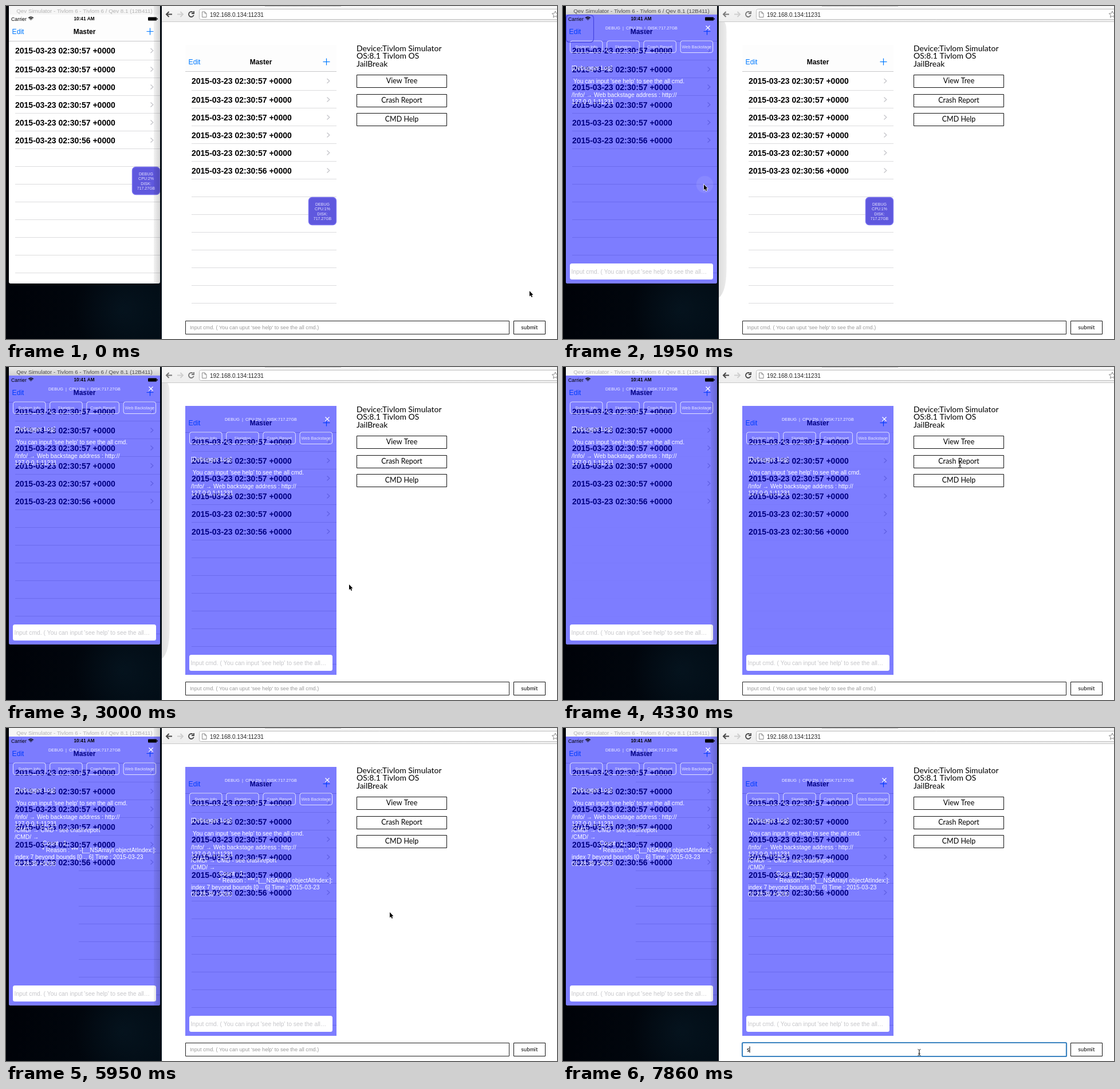
Animation of 962 by 582 pixels, one loop 8 s. Source, as an HTML page with a canvas:

```html
<!DOCTYPE html>
<html lang="en">
<head>
<meta charset="utf-8">
<title>Remote debugger</title>
<style>
html, body { margin: 0; width: 100%; height: 100%; overflow: hidden; background: #fff; }
canvas { display: block; }
</style>
</head>
<body>
<canvas id="stage" width="962" height="582"></canvas>
<script>
const ctx = document.getElementById('stage').getContext('2d');
const LOOP = 8000, STEP = 148.3;
const SANS = '"Liberation Sans", Arial, sans-serif';
const ROUND = 'Lato, sans-serif';
const BLUE = '#007aff', VEIL = 'rgba(0,0,255,.51)';

const TIME = {
  press: 1400, release: 1600, open: 1900, mirrorOpen: 2330,
  browserFront: 4300, log: 5400, mirrorLog: 5650, focus: 7000, typed: 7550
};
const CPU = [[0, 2], [150, 1], [300, 3], [450, 2], [1700, 3], [3150, 2], [3700, 3],
  [4200, 2], [4750, 4], [5300, 2], [5900, 3], [6350, 1], [7100, 2], [7550, 3]];
const POINTER = [[0, 914, 498], [700, 914, 498], [1350, 246, 312], [2050, 246, 312],
  [2700, 585, 376], [3000, 599, 380], [3250, 604, 382], [3890, 680, 172],
  [4500, 697, 170], [5700, 697, 170], [6240, 630, 551], [6500, 622, 567], [LOOP, 622, 567]];

const LOG = [
  [18, 131.5, "You can input 'see help' to see the all cmd."],
  [15, 155, '/Info/ → Web backstage address : http://'],
  [15, 167, '127.0.0.1:11231']
];
const CRASH_LOG = [
  [15, 178.5, '/CMD/ → CMD - see crashreport'],
  [15, 190, '/CMD/ →'],
  [64, 201.5, 'Count : 1;'],
  [63, 213.5, '* Reason : *** -[__NSArrayI objectAtIndex:]:'],
  [15, 225, 'index 7 beyond bounds [0 .. 6] Time : 2015-03-23'],
  [15, 237, '02:28:39 +0000']
];

function text(str, x, midY, size, color = '#000', { weight = 400, align = 'left', family = SANS } = {}) {
  ctx.font = `${weight} ${size}px ${family}`;
  ctx.textAlign = align;
  ctx.fillStyle = color;
  ctx.fillText(str, x, midY + size * 0.36);
}

function box(x, y, w, h, r, fill, stroke, width = 1) {
  ctx.beginPath();
  ctx.roundRect(x, y, w, h, r);
  if (fill) { ctx.fillStyle = fill; ctx.fill(); }
  if (stroke) { ctx.strokeStyle = stroke; ctx.lineWidth = width; ctx.stroke(); }
}

function line(color, width, ...points) {
  ctx.beginPath();
  for (let i = 0; i < points.length; i += 2) ctx.lineTo(points[i], points[i + 1]);
  ctx.strokeStyle = color;
  ctx.lineWidth = width;
  ctx.stroke();
}

function gradient(x0, y0, x1, y1, ...colors) {
  const g = ctx.createLinearGradient(x0, y0, x1, y1);
  colors.forEach((c, i) => g.addColorStop(i / (colors.length - 1), c));
  return g;
}

const mix = (a, b, k) => a + (b - a) * k;
const cpuAt = t => CPU.filter(([start]) => start <= t).pop()[1];

function pointerAt(t) {
  const i = POINTER.findIndex(p => p[0] > t);
  const [a, b] = [POINTER[i - 1], POINTER[i]];
  const k = (t - a[0]) / (b[0] - a[0]), ease = k * k * (3 - 2 * k);
  return [mix(a[1], b[1], ease), mix(a[2], b[2], ease)];
}

function list(lineX, lineAlpha) {
  box(5, 15, 264, 470, 0, '#fff');
  box(5, 15, 264, 46, 0, '#fdfdfd');
  text('Edit', 10.5, 45, 12.2, BLUE);
  text('Master', 137, 45, 12, '#000', { weight: 700, align: 'center' });
  line(BLUE, 1.2, 245.5, 44.5, 257.5, 44.5);
  line(BLUE, 1.2, 251.5, 38.5, 251.5, 50.5);
  ctx.globalAlpha = lineAlpha;
  line('#c8c8ca', 1, 5, 61.5, 269, 61.5);
  for (let i = 0; i < 13; i++) line('#dcdcde', 1, lineX, 94.5 + 31 * i, 269, 94.5 + 31 * i);
  ctx.globalAlpha = 1;
  for (let i = 0; i < 6; i++) {
    const y = i ? 79.5 + 31 * i : 78;
    text(`2015-03-23 02:30:5${i < 5 ? 7 : 6} +0000`, 16, y, 14, '#000', { weight: 700 });
    line('#c4c4c9', 1.3, 252.5, y - 4, 256.8, y, 252.5, y + 4);
  }
}

function widget(cpu) {
  box(220.5, 281.5, 48, 48, 6, '#5f58de', '#7770ef', 1.4);
  ['DEBUG', `CPU:${cpu}%`, 'DISK:', '717.27GB'].forEach((s, i) =>
    text(s, 244.5, 293.5 + 8.4 * i, 7, '#e8e6ff', { align: 'center' }));
}

function panel(cpu, hasCrash) {
  box(5, 15, 264, 470, 0, VEIL);
  text(`DEBUG  |  CPU:${cpu}%  |  DISK:717.27GB`, 137, 38, 7.3, '#f2f2ff', { align: 'center' });
  line('#fff', 1.3, 249.5, 34.5, 256.5, 41.5);
  line('#fff', 1.3, 256.5, 34.5, 249.5, 41.5);
  ['System Info', 'Skeleton', 'Crash Report', 'Web Backstage'].forEach((s, i) => {
    const x = 12.5 + 64.2 * i;
    box(x, 61, 56.5, 20.5, 3.5, null, '#e4e4ff');
    text(s, x + 28.2, 71, 7.4, '#e8e8ff', { align: 'center' });
  });
  text('[Debugger Log]', 15, 108, 10.3, '#fff');
  for (const [x, y, s] of hasCrash ? LOG.concat(CRASH_LOG) : LOG) text(s, x, y, 10.3, '#fff');
  box(12, 450, 250, 28, 3.5, '#fff');
  text("Input cmd. ( You can input 'see help' to see the all…", 14.5, 464, 10.3, '#c6c6ca');
}

function statusBar() {
  text('Carrier', 9, 22.5, 8.8);
  ctx.lineWidth = 1.4;
  ctx.strokeStyle = '#000';
  for (const r of [1, 3.4, 5.8]) {
    ctx.beginPath();
    ctx.arc(43.5, 25, r, -Math.PI * 0.76, -Math.PI * 0.24);
    ctx.stroke();
  }
  text('10:41 AM', 136.5, 22.5, 8.2, '#000', { weight: 700, align: 'center' });
  box(248, 19.5, 15, 6, 1, '#000');
  box(263.5, 21.2, 1.5, 2.6, 0.5, '#000');
}

function openingPanel(t) {
  const k = Math.max(0, (t - TIME.release) / (TIME.open - TIME.release));
  const x = mix(220, 5, k), y = mix(281, 15, k);
  box(x, y, mix(48.5, 264, k), mix(48.5, 470, k), 6, VEIL);
  box(x, y, 48.5, 48.5, 6, null, '#4b45e6', 1.6);
}

function touchMark(t) {
  const strength = Math.min(1, 1 - (t - TIME.release) / 500);
  if (t < TIME.press || strength <= 0) return;
  ctx.beginPath();
  ctx.arc(247.5, 312, 9 + 9 * (1 - strength), 0, 7);
  ctx.fillStyle = `rgba(200,200,255,${0.4 * strength})`;
  ctx.fill();
}

function simulator(t, active) {
  box(5, 0, 264, 16, 0, active ? gradient(0, 0, 0, 15, '#ebebeb', '#d0d0d0') : '#f6f6f6');
  text('Qev Simulator - Tivlom 6 - Tivlom 6 / Qev 8.1 (12B411)', 137, 8, 9.8,
    active ? '#4c4c4c' : '#b4b4b4', { align: 'center' });
  ctx.save();
  ctx.beginPath();
  ctx.roundRect(5, 15, 264, 470, [0, 0, 3, 3]);
  ctx.clip();
  list(t < TIME.log ? 16 : 127, t >= TIME.browserFront && t < TIME.log ? 0.12 : 1);
  if (t < TIME.press) widget(cpuAt(t));
  else if (t < TIME.open) openingPanel(t);
  else {
    panel(cpuAt(t), t >= TIME.log);
    const fade = 1 - (t - TIME.open) / 250;
    if (fade > 0) box(5.5, 15.5, 48, 48, 6, null, `rgba(60,60,220,${fade})`, 1.2);
  }
  statusBar();
  touchMark(t);
  ctx.restore();
  if (!active) box(258, 0, 11, 485, 0, gradient(257, 0, 269, 0, 'rgba(0,0,0,.04)', 'rgba(0,0,0,.17)'));
}

function desktop() {
  box(0, 0, 272, 582, 0, gradient(0, 480, 272, 540, '#000208', '#01060d', '#020d16'));
  const glow = ctx.createRadialGradient(205, 530, 5, 205, 530, 85);
  glow.addColorStop(0, 'rgba(10,32,46,.4)');
  glow.addColorStop(1, 'rgba(10,32,46,0)');
  box(0, 485, 272, 97, 0, glow);
}

function toolbar(active) {
  const ink = active ? '#454545' : '#777';
  box(272, 0, 690, 27, 0, gradient(0, 0, 0, 27, '#f6f6f6', '#ededed'));
  line('#c9c9c9', 1, 272, 27.5, 962, 27.5);
  line('#c4c4c4', 1, 452, 0.5, 585, 0.5);
  line(ink, 2, 290, 14.5, 280, 14.5);
  line(ink, 2, 284.5, 10, 280, 14.5, 284.5, 19);
  line('#cfcfcf', 2, 299, 14.5, 309, 14.5);
  line('#cfcfcf', 2, 304.5, 10, 309, 14.5, 304.5, 19);
  ctx.beginPath();
  ctx.arc(323.5, 14.5, 4.5, 0.3, 5.4);
  ctx.strokeStyle = ink;
  ctx.lineWidth = 1.8;
  ctx.stroke();
  line(ink, 1.8, 328, 9, 328, 13, 324, 13);
  box(337.5, 5.5, 640, 18, 3, '#fff', '#bdbdbd');
  line('#888', 1, 342.5, 10, 347, 10, 350, 13, 350, 19.5, 342.5, 19.5, 342.5, 10);
  line('#888', 1, 347, 10, 347, 13, 350, 13);
  text('192.168.0.134:11231', 356, 15, 10, '#222');
  const star = [];
  for (let i = 0; i <= 10; i++) {
    const a = i * Math.PI / 5 - Math.PI / 2, r = i % 2 ? 2.8 : 6;
    star.push(959 + r * Math.cos(a), 15 + r * Math.sin(a));
  }
  line('#888', 1, ...star);
}

function simulatorShadow() {
  ctx.beginPath();
  ctx.moveTo(272, 27);
  ctx.lineTo(281, 27);
  ctx.quadraticCurveTo(285.5, 30, 285.5, 45);
  ctx.lineTo(285.5, 460);
  ctx.quadraticCurveTo(285, 500, 272, 510);
  ctx.fillStyle = gradient(272, 0, 286, 0, '#dedede', '#ececec');
  ctx.fill();
}

function browser(t, active) {
  box(272, 0, 690, 582, 0, '#fff');
  if (!active) simulatorShadow();
  toolbar(active);

  ctx.save();
  ctx.translate(308, 53);
  list(16, t >= TIME.browserFront && t < TIME.mirrorLog ? 0.2 : 1);
  if (t < TIME.mirrorOpen) widget(1);
  else panel(2, t >= TIME.mirrorLog);
  ctx.restore();

  ['Device:Tivlom Simulator', 'OS:8.1 Tivlom OS', 'JailBreak'].forEach((s, i) =>
    text(s, 612, 74 + 13.4 * i, 14, '#000', { family: ROUND }));
  ['View Tree', 'Crash Report', 'CMD Help'].forEach((s, i) => {
    const y = 120.5 + Math.round(33.5 * i);
    box(612.5, y, 157, 22, 0, '#fff', '#111');
    text(s, 691, y + 10.3, 12.5, '#000', { align: 'center', family: ROUND });
  });

  const focused = t >= TIME.focus, typed = t >= TIME.typed;
  box(313.5, 550.5, 565, 23, 0, '#fff', '#222');
  if (focused) {
    const caretX = typed ? 326 : 321.5;
    box(313, 550, 566, 24, 1.5, null, '#3b83c0', 2.2);
    line('#000', 1, caretX, 556.5, caretX, 567.5);
  }
  if (typed) text('s', 321, 562, 10.5, '#000', { family: ROUND });
  else text("Input cmd. ( You can uput 'see help' to see the all cmd.)", 321, 562, 9.2, '#999');
  box(886.5, 550.5, 55, 23, 0, '#fff', '#111');
  text('submit', 914, 561.5, 9.7, '#000', { align: 'center', family: ROUND });
}

function pointer(t) {
  const [x, y] = pointerAt(t);
  ctx.save();
  ctx.translate(Math.round(x), Math.round(y));
  if (t > 3800 && (t < 5720 || t > 6350)) {
    line('#222', 1, -2.5, -5.5, -0.5, -4.5, 0, -4.5, 0.5, -4.5, 2.5, -5.5);
    line('#222', 1.2, 0, -4.5, 0, 4.5);
    line('#222', 1, -2.5, 5.5, 0, 4.5, 2.5, 5.5);
    line('#222', 1, -1.8, 2, 1.8, 2);
  } else {
    ctx.beginPath();
    for (const [px, py] of [[0, 0], [0, 9.5], [2.1, 7.6], [3.6, 11], [5.2, 10.3], [3.7, 7], [6.4, 6.8]])
      ctx.lineTo(px, py);
    ctx.closePath();
    ctx.lineWidth = 1.4;
    ctx.strokeStyle = '#fff';
    ctx.stroke();
    ctx.fillStyle = '#000';
    ctx.fill();
  }
  ctx.restore();
}

function draw(now) {
  const t = Math.floor((now % LOOP) / STEP) * STEP + 1;
  const simActive = t >= TIME.press && t < TIME.browserFront;
  desktop();
  browser(t, !simActive);
  simulator(t, simActive);
  pointer(t);
}

const start = performance.now();
function tick() {
  draw(performance.now() - start);
  requestAnimationFrame(tick);
}
tick();
</script>
</body>
</html>
```
